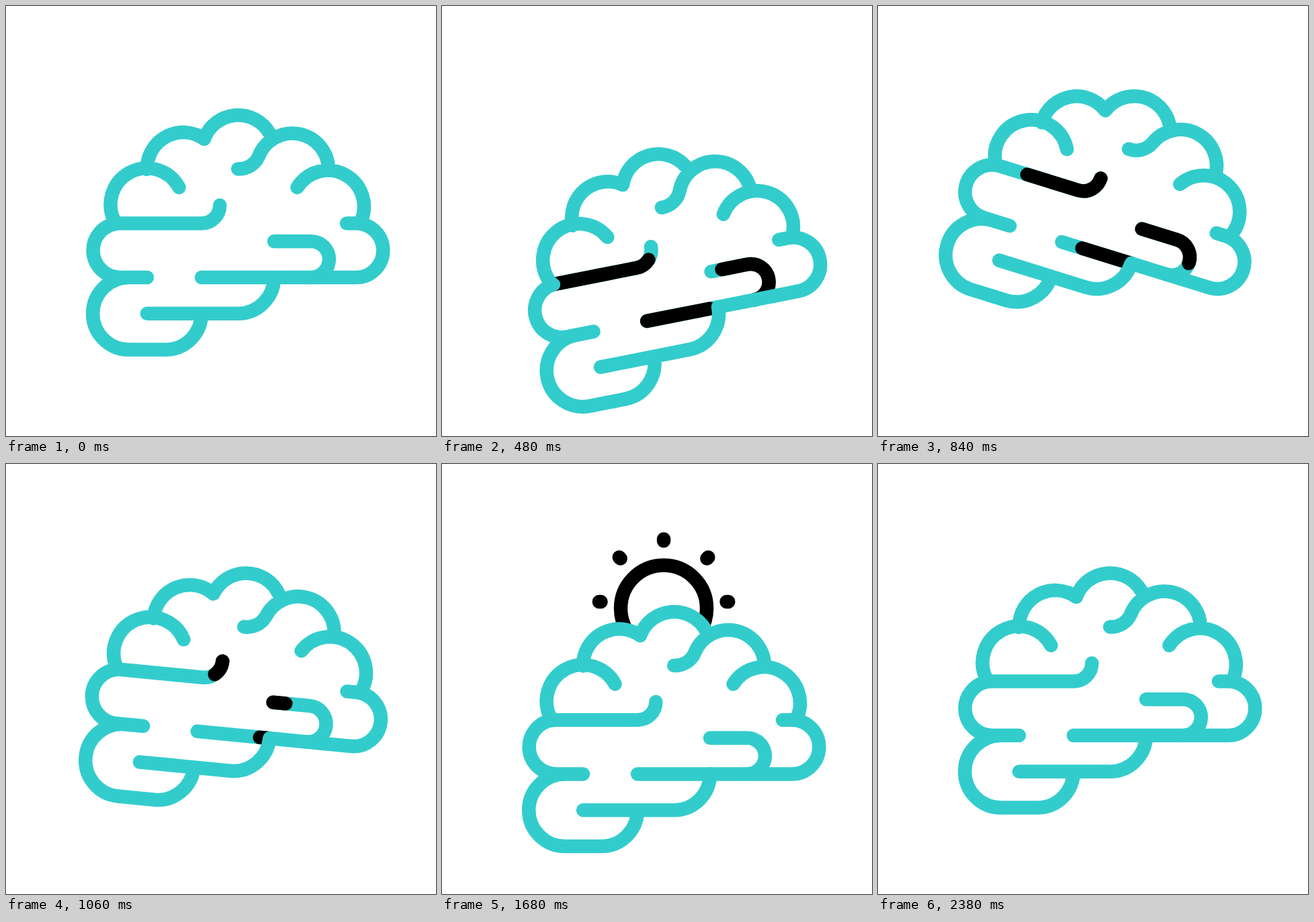
Write an HTML page that moves like this. It is 640 px wide and 640 px high and loops after 2400 ms.

```html
<!DOCTYPE html>
<html lang="en">
<head>
<meta charset="utf-8">
<title>Brain idea</title>
<style>
  html, body { margin: 0; width: 100%; height: 100%; overflow: hidden; background: #fff; }
  svg { display: block; width: 100%; height: 100%; }
  path { fill: none; stroke: #3cc; stroke-width: 20.5; stroke-linecap: round; stroke-linejoin: round; }
  .ink { stroke: #000; }
  #body { fill: #fff; stroke: none; }
</style>
</head>
<body>
<svg viewBox="0 0 640 640">
  <g id="rays"></g>
  <g id="bulb">
    <path class="ink" d="M-32 72H32M-11 129A21 21 0 0 1-32 108V72C-32 62-38 54-45.5 46A64 64 0 1 1 45.5 46C38 54 32 62 32 72V108A21 21 0 0 1 11 129Z"/>
  </g>
  <g id="brain">
    <path id="body" d="M162 321A53.8 53.8 0 0 1 210 243A53.8 53.8 0 0 1 295 198A53.8 53.8 0 0 1 392 189L399 196A53.8 53.8 0 0 1 480 243A53.8 53.8 0 0 1 528 321A40.3 40.3 0 0 1 521 404H399A53.8 53.8 0 0 1 345.5 457.8H291A53.8 53.8 0 0 1 237.5 511.6H183A53.8 53.8 0 0 1 183 404H170A40.3 40.3 0 0 1 170 323.4Z"/>
    <g id="folds"></g>
    <path d="M210 243A53.8 53.8 0 0 1 295 198A53.8 53.8 0 0 1 392 189
      M480 243A53.8 53.8 0 0 0 376 224A32 32 0 0 1 345.2 242.5
      M257.5 270A53.8 53.8 0 0 0 162 321
      M433.5 270A53.8 53.8 0 0 1 528 321
      M165 323.7A40.3 40.3 0 0 0 170 404H210
      M183 404A53.8 53.8 0 0 0 183 511.6H237.5A53.8 53.8 0 0 0 291 457.8
      M210 457.8H345.5A53.8 53.8 0 0 0 399 404
      M399 404H521A40.3 40.3 0 0 0 521 323.4H507"/>
  </g>
</svg>
<script>
const LOOP = 2400;
const $ = id => document.getElementById(id);

// Tables of [time in ms, value], eased between steps
const tilt = [[0, 0], [355, -17.3], [825, 17.3], [1204, 0]];
const drop = [[20, 0], [535, 57.5], [885, -38], [1297, 57.5], [2155, 57.5], [2370, 0]];
const bulbY = [[1090, 300], [1392, 113.8], [1628, 213.8], [2155, 213.8], [2340, 300]];
const foldHead = [[60, 0], [595, 1]];
const foldTail = [[650, 0], [1185, 1]];
const rayHead = [[1625, 0], [1880, 1]];
const rayTail = [[1865, 0], [2210, 1]];

function at(keys, t) {
  if (t <= keys[0][0]) return keys[0][1];
  for (let i = 1; i < keys.length; i++) {
    const [t0, a] = keys[i - 1], [t1, b] = keys[i];
    if (t < t1) {
      const u = (t - t0) / (t1 - t0);
      return a + (b - a) * u * u * (3 - 2 * u);
    }
  }
  return keys[keys.length - 1][1];
}

function addPath(parent, d, cls) {
  const p = document.createElementNS('http://www.w3.org/2000/svg', 'path');
  p.setAttribute('d', d);
  p.setAttribute('pathLength', 1);
  if (cls) p.setAttribute('class', cls);
  parent.append(p);
  return p;
}

const foldPaths = [
  'M162 323.4H291.5A26.9 26.9 0 0 0 318.3 296.5',
  'M291 404H399',
  'M454 404A26.9 26.9 0 0 0 454 350.2H399'
];
foldPaths.forEach(d => addPath($('folds'), d));
const folds = foldPaths.map(d => addPath($('folds'), d, 'ink'));

const rays = [115.5, 113, 112.5, 113, 115.5].map((r, i) => {
  const a = Math.PI * (1 + i / 4);
  const point = d => `${330 + d * Math.cos(a)} ${205 + d * Math.sin(a)}`;
  return addPath($('rays'), `M${point(r - 22)}L${point(r)}`, 'ink');
});

function trim(paths, tail, head) {
  const shown = head - tail > 0.001;
  for (const p of paths) {
    p.style.display = shown ? '' : 'none';
    p.style.strokeDasharray = `${head - tail} 2`;
    p.style.strokeDashoffset = -tail;
  }
}

function draw(t) {
  $('brain').setAttribute('transform',
    `translate(0 ${at(drop, t)}) rotate(${at(tilt, t)} 345 337)`);
  $('bulb').setAttribute('transform', `translate(330 ${at(bulbY, t)})`);
  $('bulb').style.display = t > 1090 && t < 2340 ? '' : 'none';
  trim(folds, at(foldTail, t), at(foldHead, t));
  trim(rays, at(rayTail, t), at(rayHead, t));
}

const start = performance.now();
function tick() {
  draw((performance.now() - start) % LOOP);
  requestAnimationFrame(tick);
}
tick();
</script>
</body>
</html>
```
